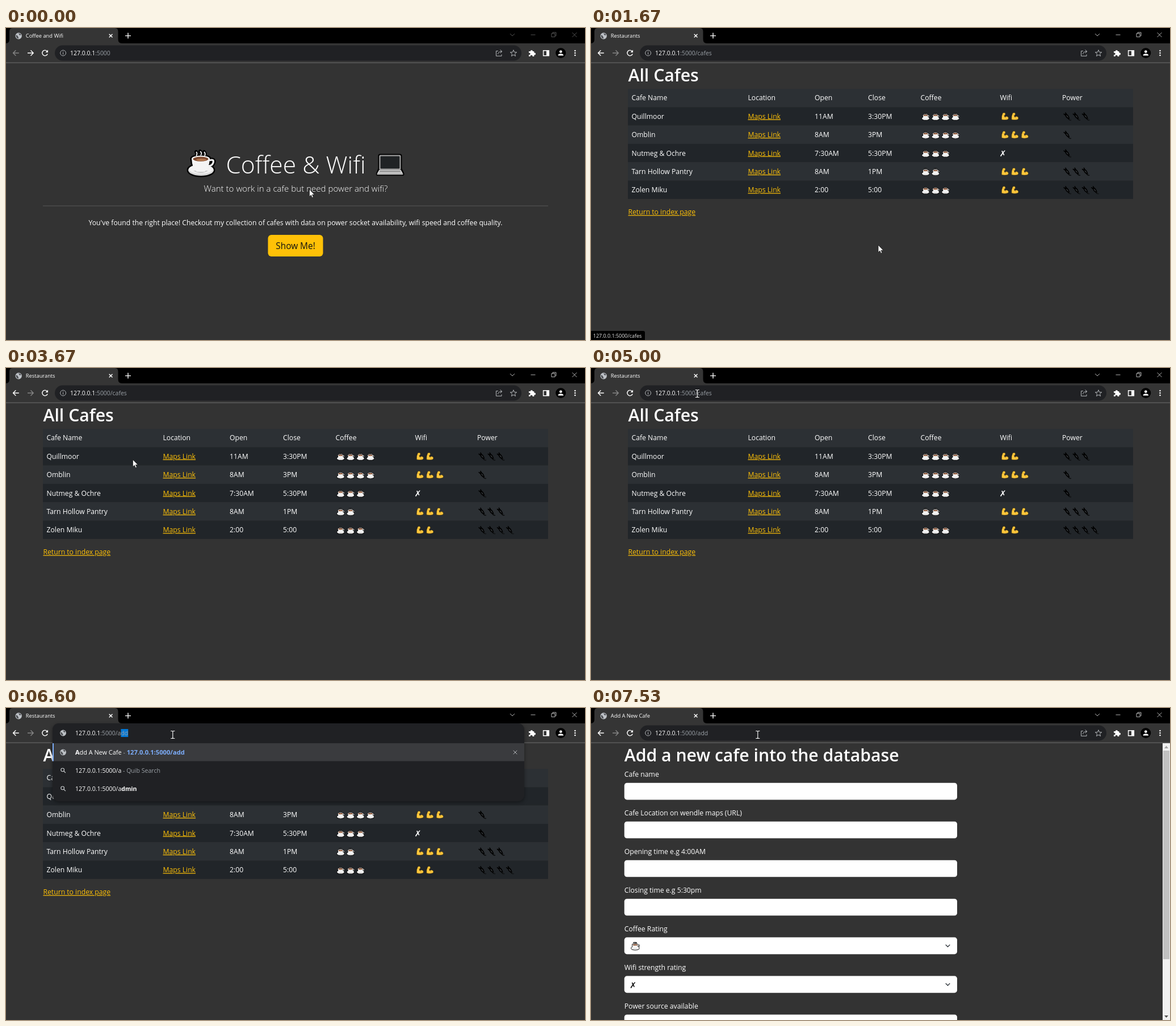
These frames come from a looping animation (1020 by 549 pixels, 8 s). An HTML page:

```html
<!DOCTYPE html>
<html lang="en">
<head>
<meta charset="utf-8">
<title>Coffee and Wifi</title>
<style>
html, body { margin: 0; width: 100%; height: 100%; overflow: hidden; background: #333; }
svg { display: block; width: 100vw; height: 100vh; }
text { font-family: "Open Sans", "Noto Sans", sans-serif; font-size: 12.2px; fill: #fff; white-space: pre; }
.h1 { font-size: 30.2px; font-weight: 600; }
.hero { font-size: 42.6px; font-weight: 300; text-anchor: middle; }
.lead { font-size: 15.1px; font-weight: 300; text-anchor: middle; }
.mid { text-anchor: middle; }
.btn { font-size: 15.4px; text-anchor: middle; fill: #111; }
.link { fill: #ffc107; text-decoration: underline; }
.tab { font-size: 9.3px; }
.url { font-size: 10.45px; }
.globe { font-size: 10.9px; }
.search { font-size: 10.55px; }
.status { font-size: 8.95px; fill: #e8e8e8; }
.mark { font-family: "DejaVu Sans", sans-serif; font-size: 14.5px; font-weight: bold; }
.dim { fill: #9aa0a6; }
.hit { fill: #7cacf8; font-size: 11.2px; font-weight: 700; }
.b { font-weight: 700; }
.line { fill: none; stroke: #fff; stroke-width: 1.4; }
.soft { fill: none; stroke: #b4b7ba; stroke-width: 1; }
#popup { filter: drop-shadow(0 2px 3px rgba(0,0,0,.4)); }
</style>
</head>
<body>
<svg id="stage" viewBox="0 0 1020 549" preserveAspectRatio="none"></svg>
<script>
const LOOP = 8000, STEP = 1000 / 15;
const HOST = '127.0.0.1', BASE = HOST + ':5000';
const TITLES = ['Coffee and Wifi', 'Restaurants', 'Add A New Cafe'];
const PATHS = ['', '/cafes', '/add'];

const text = (x, y, s, cls = '') => `<text x="${x}" y="${y}" class="${cls}">${s}</text>`;
const rect = (x, y, w, h, fill, r = 0, more = '') =>
  `<rect x="${x}" y="${y}" width="${w}" height="${h}" rx="${r}" fill="${fill}" ${more}/>`;
const path = (d, cls = 'line', more = '') => `<path d="${d}" class="${cls}" ${more}/>`;
const icon = (id, x, y, s = 1) => `<use href="#${id}" transform="translate(${x} ${y}) scale(${s})"/>`;
const group = (id, body) => `<g id="${id}">${body}</g>`;
const range = n => [...Array(n).keys()];
const cross = (x, y, r) => `M${x - r} ${y - r}l${2 * r} ${2 * r}m0 ${-2 * r}l${-2 * r} ${2 * r}`;
const star = (cx, cy, big, small) => 'M' + range(10).map(i => {
  const a = -Math.PI / 2 + i * Math.PI / 5, r = i % 2 ? small : big;
  return `${(cx + r * Math.cos(a)).toFixed(1)} ${(cy + r * Math.sin(a)).toFixed(1)}`;
}).join('L') + 'Z';

const cupBody = 'M9 16Q10 33 18 39H32Q40 33 41 16Z';
const handle = 'M40 19Q49 16 47 23Q45 29 37 29';
const steam = 'M17 4Q20 7 17 11M24 3Q28 6 25 10M31 4Q34 7 32 11';
const defs = `<defs>
<g id="globe"><circle r="5.7" fill="#bdc1c6"/>
  <path d="M-4.600 -2Q-2 -1 -1 1T0 4.600Q-4.600 4.600 -4.600 -2ZM-1 -4.600Q4 -4.600 4.200 -2Q2 0 1.400 -2T-1 -4.600Z" fill="#4a4c50"/></g>
<g id="search" fill="none" stroke="#c4c7c9" stroke-width="1.3"><circle cx="-1" cy="-1" r="3"/><path d="M1.2 1.2L4.6 4.6"/></g>
<g id="cup">
  <g fill="#000" stroke="#000" stroke-width="5" stroke-linejoin="round" stroke-linecap="round">
    <ellipse cx="25.5" cy="36" rx="22.5" ry="10"/><path d="${cupBody}"/><ellipse cx="25" cy="16" rx="16" ry="5"/>
    <path d="${handle}" stroke-width="8"/><path d="${steam}" stroke-width="6"/></g>
  <ellipse cx="25.5" cy="36" rx="22.5" ry="10" fill="#d9d9d9"/>
  <ellipse cx="25.5" cy="34.5" rx="21" ry="8" fill="#f2f2f2"/>
  <path d="${handle}" fill="none" stroke="#eee" stroke-width="3.4"/>
  <path d="M12 37Q25 45 38 37Z" fill="#c6c6c6"/>
  <path d="${cupBody}" fill="#f4f4f4"/><ellipse cx="25" cy="16" rx="16" ry="5.4" fill="#fff"/>
  <ellipse cx="25" cy="16.6" rx="13.6" ry="4.1" fill="#7d4a30"/><ellipse cx="26" cy="18" rx="9" ry="2" fill="#b0764f"/>
  <path d="${steam}" fill="none" stroke="#e8e8e8" stroke-width="2"/></g>
<g id="arm"><path d="M3 .5Q6 -1 7.6 1Q8.6 4 6.2 4.6Q5.6 7 6.8 7.9Q9.5 5.4 12.4 7.4Q14.6 10 12.2 12.2Q6 14 .8 12.2Q.2 6 3 .5Z" fill="#ffc83d" stroke="#1a1300" stroke-width=".5"/>
  <path d="M7 8.2Q7.6 10 9.4 9.6M4 4.3H6.6" fill="none" stroke="#d08a12" stroke-width=".7"/></g>
<g id="plug" fill="none" stroke-linecap="round">
  <path d="M1.200 2.800L4 5M4 .8L6 4M8 9.500Q10.500 13.600 13 13.400" stroke="#000" stroke-width="1.700"/>
  <path d="M4.2 3.6Q8.400 4.200 10 10.800Q4.400 8.600 4.200 3.600Z" fill="#000" stroke="#000" stroke-width="2.200"/>
  <path d="M4.800 4.600Q7.800 5.400 9.200 9.800Q5.600 8 4.800 4.600Z" fill="#3a3d40"/>
  <path d="M10 11.400Q11.400 13.200 12.800 13.200" stroke="#3c3f42" stroke-width=".7"/></g>
</defs>`;

const laptop = `
  <path d="M659 221.5H694Q697.5 221.5 697.5 225V247L701.5 256Q702 260 698.5 260H655Q651.500 260 652 256L655.500 247V225Q655.500 221.500 659 221.500Z" fill="#000"/>
  ${rect(657.5, 223.5, 38, 26, '#a9a9a9', 2)}${rect(659.5, 225.5, 34, 22, '#202325', 1)}
  <path d="M657.500 249.500H695.500L699.500 256.500H653.500Z" fill="#cfcfcf"/>
  <path d="M659 251H694L696 254H657Z" fill="#9c9c9c"/>${rect(653.5, 256.3, 46, 2, '#b5b5b5', 1)}`;

const home = group('page0',
  icon('cup', 318, 214) + laptop +
  text(510.5, 256, 'Coffee &amp; Wifi', 'hero') +
  text(510.5, 287.5, 'Want to work in a cafe but need power and wifi?', 'lead') +
  rect(65, 312.5, 890, 1, '#595959') +
  text(510, 347, "You've found the right place! Checkout my collection of cafes with data on power socket availability, wifi speed and coffee quality.", 'mid') +
  rect(461.5, 364, 97, 38, '#ffc107', 6) + rect(461.5, 364, 97, 38, '#ffca2c', 6, 'id="hover"') +
  text(510, 389, 'Show Me!', 'btn'));

const COLS = [71.5, 276.5, 394, 488, 580.5, 720.5, 830];
const HEAD = ['Cafe Name', 'Location', 'Open', 'Close', 'Coffee', 'Wifi', 'Power'];
const CAFES = [
  ['Quillmoor', '11AM', '3:30PM', 4, 2, 3],
  ['Omblin', '8AM', '3PM', 4, 3, 1],
  ['Nutmeg &amp; Ochre', '7:30AM', '5:30PM', 3, 0, 1],
  ['Tarn Hollow Pantry', '8AM', '1PM', 2, 3, 3],
  ['Zolen Miku', '2:00', '5:00', 3, 2, 4]];
const TOP = 107, ROW = 32.3;
const repeat = (id, n, x, gap, y, s) => range(n).map(i => icon(id, x + i * gap, y, s)).join('');
const cafeRow = ([name, open, close, coffee, wifi, power], i) => {
  const y = 155.5 + i * 32.4, base = y + 4.2;
  return rect(65, TOP + (i + 1) * ROW, 890, ROW, i % 2 ? '#2c3034' : '#212529') +
    text(COLS[0], base, name) + text(COLS[1], base, 'Maps Link', 'link') +
    text(COLS[2], base, open) + text(COLS[3], base, close) +
    repeat('cup', coffee, 582.2, 17.5, y - 6.6, .285) +
    (wifi ? repeat('arm', wifi, 722.5, 17.5, y - 6.4, .97) : text(719.5, base + 1, '✗', 'mark')) +
    repeat('plug', power, 832, 16.2, y - 7);
};
const list = group('page1',
  text(65.5, 93.8, 'All Cafes', 'h1') + rect(65, TOP, 890, ROW, '#2c3034') +
  HEAD.map((s, i) => text(COLS[i], 127.3, s)).join('') + CAFES.map(cafeRow).join('') +
  text(65.5, 328.2, 'Return to index page', 'link'));

const LABELS = ['Cafe name', 'Cafe Location on wendle maps (URL)', 'Opening time e.g 4:00AM',
  'Closing time e.g 5:30pm', 'Coffee Rating', 'Wifi strength rating', 'Power source available'];
const field = (label, i) => {
  const y = 131.8 + i * 67.95;
  return text(58.7, y - 10.8, label) + rect(58.7, y, 586.3, 29.6, '#fff', 4.6) +
    (i > 3 ? path(`M624.700 ${y + 13}l3.800 3.700l3.800 -3.700`, 'line', 'style="stroke:#343a40"') : '');
};
const form = group('page2',
  text(58.7, 93.8, 'Add a new cafe into the database', 'h1') + LABELS.map(field).join('') +
  icon('cup', 70, 411.5, .31) + `<text x="68" y="492.5" class="mark" style="fill:#111">✗</text>` +
  rect(1007, 62, 13, 487, '#f1f1f1') + rect(1008, 75, 11, 367, '#c1c1c1') +
  '<path d="M1010 71L1013.500 66.500L1017 71Z" fill="#a3a3a3"/><path d="M1010 541L1013.500 545L1017 541Z" fill="#505050"/>');

const chrome =
  rect(0, 0, 1020, 27, '#000') + rect(0, 27, 1020, 34, '#353535') + rect(0, 60.6, 1020, 1, '#707070') +
  '<path d="M0 27Q6 27 6 20V6Q6 0 12 0H191.500Q197.500 0 197.500 6V20Q197.500 27 204 27Z" fill="#353535"/>' +
  group('favicon', icon('globe', 22.2, 14)) + '<text id="title" x="34.8" y="17" class="tab"></text>' +
  path(cross(184.6, 13.6, 2.9)) + path('M210 13.600H220M215 8.600V18.600', 'line', 'stroke-width="1.8"') +
  group('window', path('M888 10L892 14L896 10M924.500 12H932.500M961 9.700H967V15.700H961ZM963 9.500V7.800H969V13.800H967.500' +
    cross(1001.5, 12, 4), 'line', 'style="stroke:inherit;stroke-width:.9"')) +
  path('M22.800 44H12.800M17.300 39.300L12.600 44L17.300 48.700', 'line', 'id="back"') +
  path('M38 44H48M43.500 39.300L48.200 44L43.500 48.700', 'line', 'id="next"') +
  group('reload', path('M72.200 40.700A4.800 4.800 0 1 0 73.200 45.500') + '<path d="M74 38.500V43H69.500Z" fill="#fff"/>') +
  path(cross(68.6, 44, 4.2), 'line', 'id="stop"') +
  '<path d="M921 41H923.800A2.100 2.100 0 1 1 928 41H930.300V43.500A2.100 2.100 0 1 1 930.300 47.500V50H927.500A1.900 1.900 0 1 0 923.800 50H921V47.200A1.900 1.900 0 1 0 921 43.700Z" fill="#fff"/>' +
  path('M946.600 39.800H956.400V48.700H946.600Z') + rect(952, 39.5, 5, 9.5, '#fff') +
  '<circle cx="977.3" cy="44" r="9" fill="#000"/><circle cx="977.3" cy="41.600" r="2.400" fill="#fff"/><path d="M972.500 48.500Q972.500 45.200 977.300 45.200T982.100 48.500Z" fill="#fff"/>' +
  [40, 44, 48].map(y => `<circle cx="1002.5" cy="${y}" r="1.3" fill="#fff"/>`).join('') +
  rect(86, 30.5, 822, 27, '#202124', 13.5) +
  rect(86, 30.5, 822, 27, 'none', 13.5, 'id="ring" stroke="#8ab4f8" stroke-width="1.5"');

const omnibox =
  group('info', '<circle cx="100.6" cy="44" r="4.900" class="soft"/>' + path('M100.600 43V46.800M100.600 41V42.200', 'soft')) +
  group('site', icon('globe', 100.6, 44, .95)) +
  group('actions', path('M867 40.500H863.500V49.300H873V46.500M866.500 46Q867 41.600 873 41.300M870.500 38.500L874 41.300L870.500 44', 'soft') +
    path(star(894, 44.6, 6, 2.6), 'soft')) +
  rect(0, 37, 0, 14, '#0078d7', 0, 'id="sel"') + '<text id="url" y="47.7" class="url"></text>' +
  rect(0, 36.5, 1, 14.5, '#fff', 0, 'id="caret"');

const popup = group('popup', '<rect id="sheet" x="82" y="27" width="831" fill="#202124" rx="11"/>' +
  rect(82, 62, 831, 31.5, '#3a3b3e') + rect(82, 62, 2, 31.5, '#7cacf8') + path(cross(897, 78, 3.3), 'soft') + '<g id="rows"></g>');

const cursor = group('arrow', '<path d="M0 0V12.700L2.900 10L4.800 14.400L6.900 13.500L5 9.200H9Z" fill="#fff" stroke="#111" stroke-width=".7"/>') +
  group('beam', '<path d="M-3.500 -6.500H-1.500Q0 -6.500 0 -5V5Q0 6.500 -1.500 6.500H-3.500M3.500 -6.500H1.500Q0 -6.500 0 -5M0 5Q0 6.500 1.500 6.500H3.500" fill="none" stroke="#fff" stroke-width="1.100"/>');

const stage = document.getElementById('stage');
stage.innerHTML = defs + rect(0, 0, 1020, 549, '#333') + home + list + form + chrome + popup + omnibox +
  group('status', '<path d="M0 533H92Q95 533 95 536V549H0Z" fill="#000"/>' + text(3.8, 544.8, BASE + '/cafes', 'status')) + cursor;

const el = {};
stage.querySelectorAll('[id]').forEach(n => el[n.id] = n);
const show = (id, on) => el[id].setAttribute('display', on ? 'inline' : 'none');
const set = (id, attrs) => { for (const k in attrs) el[id].setAttribute(k, attrs[k]); };
const clamp = v => Math.max(0, Math.min(1, v));

// time, x, y of the pointer
const TRACK = [
  [0, 534.5, 284], [67, 534, 288], [200, 524, 325], [333, 509, 375], [400, 506, 382],
  [2067, 506, 382], [2133, 500, 379], [2267, 440, 352], [2400, 352, 334], [2467, 320, 333], [2600, 302, 339],
  [3200, 302, 339], [3333, 308, 326], [3467, 294, 285], [3733, 200, 120], [3867, 153, 60], [3933, 144, 42], [4067, 192, 48],
  [4133, 192, 48], [4333, 187.3, 46], [4667, 187.3, 46], [4733, 187.3, 45],
  [5267, 187.3, 45], [5533, 292, 47], [5667, 292, 47], [5800, 293.8, 47]];
function pointer(t) {
  const i = TRACK.findIndex(p => p[0] > t);
  if (i < 0) return TRACK[TRACK.length - 1].slice(1);
  const [a, b] = [TRACK[i - 1], TRACK[i]], k = (t - a[0]) / (b[0] - a[0]);
  return [a[1] + (b[1] - a[1]) * k, a[2] + (b[2] - a[2]) * k];
}

const span = (s, cls) => `<tspan class="${cls}">${s}</tspan>`;
const site = (name, p, typed = 0) => ['globe',
  span(name.slice(0, typed), 'b') + name.slice(typed) + span(' - ', 'dim') + span(BASE + p, 'hit')];
const query = p => ['search', BASE + p + span(' - Quib Search', 'dim')];
function suggestions(typed) {
  if (!typed) return [site(TITLES[0], ''), query('/'), site(TITLES[2], '/add'), site(TITLES[1], '/cafes')];
  const rows = [site(TITLES[2], '/add', typed.length), query('/' + typed)];
  const more = ['search', BASE + '/' + typed + span('admin'.slice(typed.length), 'b')];
  return typed === 'add' ? rows : [...rows, more];
}

function draw(t) {
  const page = t < 1660 ? 0 : t < 7520 ? 1 : 2;
  const loading = t > 1460 && page === 0 || t > 7460 && page === 1;
  const editing = t > 6390 && t < 7460;
  const focused = t > 5330 && t < 6390;
  const [x, y] = pointer(t);

  range(3).forEach(i => show('page' + i, i === page));
  el.title.textContent = TITLES[page];
  show('favicon', !loading);
  show('reload', !loading);
  show('stop', loading);
  set('window', { stroke: t < 1330 ? '#5c5c5c' : '#c8c8c8' });
  el.back.style.stroke = page ? '#fff' : '#858585';
  el.next.style.stroke = page ? '#858585' : '#fff';
  set('hover', { opacity: clamp((t - 300) / 150) });
  set('status', { opacity: t < 2000 ? clamp((t - 333) / 200) : 1 - clamp((t - 2867) / 267) });

  const typed = t < 6590 ? '' : t < 6860 ? 'a' : t < 7120 ? 'ad' : 'add';
  const tail = editing ? (typed ? '/add' : '/') : t > 7460 ? '/add' : PATHS[page];
  const left = editing ? 122 : 113;
  set('url', { x: left });
  el.url.innerHTML = HOST + span(':5000' + tail, 'dim');
  const at = n => left + el.url.getSubStringLength(0, n);
  const size = BASE.length + tail.length;
  const from = BASE.length + 1 + (editing ? typed.length : 0);
  const selecting = focused || editing && from < size;
  const end = focused ? Math.min(x, at(size)) : at(size);
  show('sel', selecting);
  if (selecting) set('sel', { x: at(from), width: Math.max(0, end - at(from)) });
  show('caret', editing && !selecting);
  set('caret', { x: at(size) + .5 });
  show('ring', focused);
  show('info', !editing);
  show('site', editing);
  show('actions', !editing);

  const open = t > 6390 && page === 1;
  show('popup', open);
  if (open) {
    const rows = suggestions(typed);
    set('popup', { opacity: clamp(.1 + (t - 6400) / 160) });
    set('sheet', { height: 41 + rows.length * 32 });
    el.rows.innerHTML = rows.map(([kind, s], i) =>
      icon(kind, 100.6, 77.8 + i * 32, .95) + text(122, 81.6 + i * 32, s, kind)).join('');
  }

  const inBar = y < 58;
  show('arrow', !inBar);
  show('beam', inBar);
  set(inBar ? 'beam' : 'arrow', { transform: `translate(${x} ${y})` });
}

const start = performance.now();
function tick() {
  const t = (performance.now() - start) % LOOP;
  draw(Math.floor((t + 5) / STEP) * STEP);
  requestAnimationFrame(tick);
}
tick();
</script>
</body>
</html>
```
